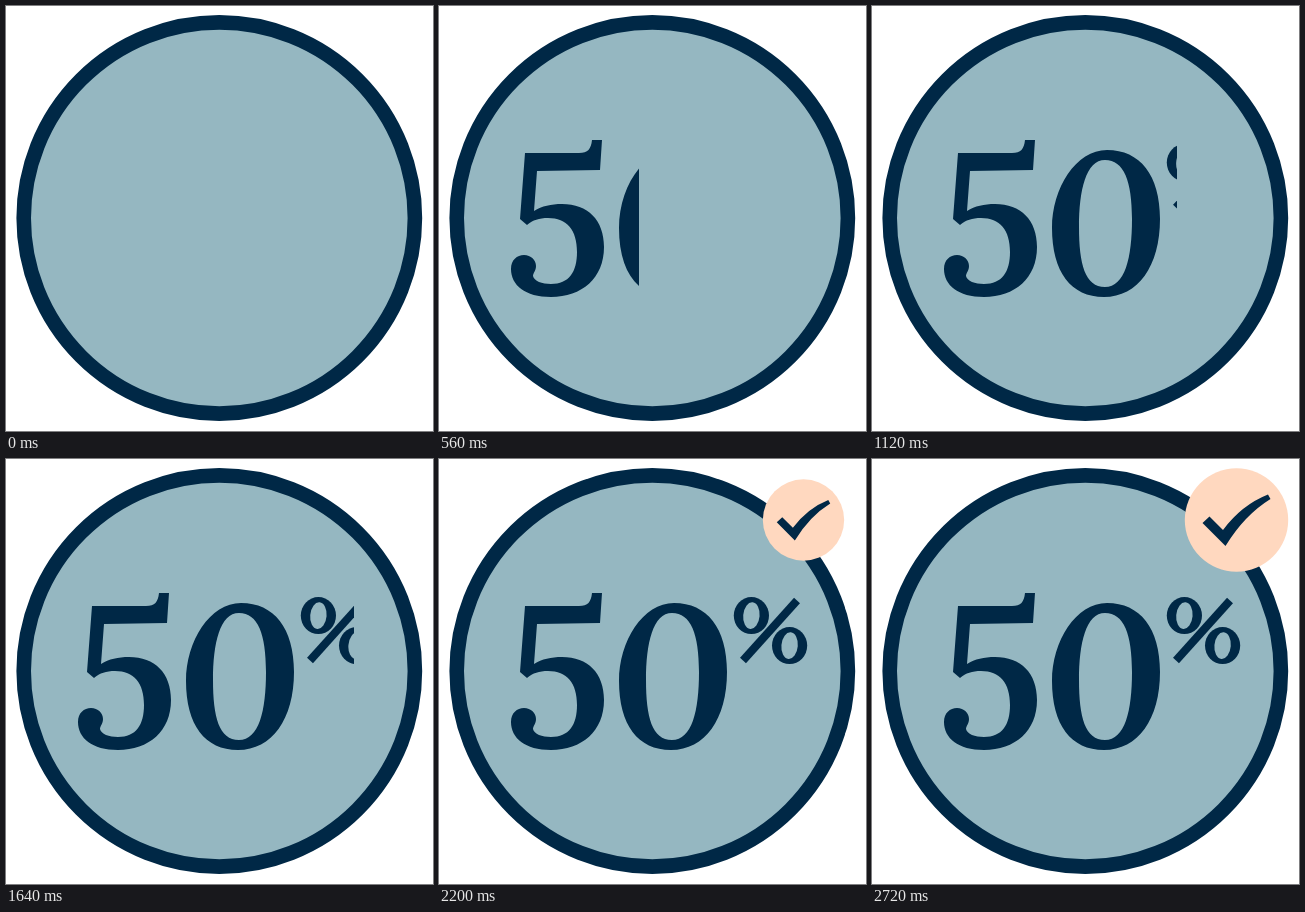
Animation of 427 by 425 pixels, one loop 3.84 s. Source, as an HTML page:

```html
<!DOCTYPE html>
<html lang="en">
<head>
<meta charset="utf-8">
<title>50%</title>
<style>
  html, body { margin: 0; width: 100%; height: 100%; overflow: hidden; background: #fff; }
  svg { display: block; width: 100%; height: 100%; }
</style>
</head>
<body>
<svg viewBox="0 0 427 425" role="img" aria-label="50%">
  <defs>
    <clipPath id="wipe"><rect id="edge" width="0" height="425"/></clipPath>
  </defs>
  <circle cx="213.3" cy="212" r="195.6" fill="#95b7c1" stroke="#002846" stroke-width="14.6"/>
  <g clip-path="url(#wipe)" fill="#002846" fill-rule="evenodd">
    <!-- five -->
    <path d="M86 147H140C149 147 152 143 153 134H163L161 164L98 165L95 205C103 200 112 198 123 198
      C149 198 165 214 165 241C165 272 143 291 112 291C86 291 72 279 72 263C72 254 78 249 85 249
      C92 249 97 254 97 260C97 265 94 267 94 270C95 275 103 278 112 278C130 278 138 266 138 246
      C138 224 128 212 109 212C100 212 94 214 88 219L81 213Z"/>
    <!-- zero -->
    <path d="M180 222C180 182 204 144 235 144C268 144 288 169 288 213C288 260 266 291 232 291
      C199 291 180 266 180 222ZM207 221C207 258 213 281 233 281C253 281 260 252 260 213
      C260 175 252 154 233 154C214 154 207 184 207 221Z"/>
    <!-- percent -->
    <path d="M358 141.5L304 201.5" stroke="#002846" stroke-width="8"/>
    <g id="ring">
      <ellipse cx="312.4" cy="156.6" rx="17.6" ry="18.5"/>
      <ellipse cx="312.4" cy="156.6" rx="8.2" ry="13.4" fill="#95b7c1" transform="rotate(5 312.4 156.6)"/>
    </g>
    <use href="#ring" x="38.2" y="30"/>
  </g>
  <g id="badge">
    <circle r="51.7" fill="#ffd8bf"/>
    <path d="M-34 3L-27 -3.5L-13.5 10Q5 -15 31.5 -25.5L34 -21Q8 -5 -11 26Z" fill="#002846"/>
  </g>
</svg>
<script>
  const LOOP = 3840, STEP = 40, FULL = 51.7, PEAK = 54.9;
  const edge = document.getElementById('edge');
  const badge = document.getElementById('badge');

  // Wipe keys: time, x, speed in px per ms
  const keys = [[0, 71, .05], [560, 200, .31], [1120, 305, .11], [1640, 348, .075], [1960, 370, .06]];

  const smooth = (t, a, b) => {
    const s = Math.min(1, Math.max(0, (t - a) / (b - a)));
    return s * s * (3 - 2 * s);
  };

  function wipeX(t) {
    const i = keys.findIndex(k => k[0] > t);
    if (i < 0) return 427;
    const [t0, x0, v0] = keys[i - 1], [t1, x1, v1] = keys[i];
    const d = t1 - t0, s = (t - t0) / d, r = 1 - s, p = s * s * (3 - 2 * s);
    return x0 + (x1 - x0) * p + d * s * r * (v0 * r - v1 * s);
  }

  function badgeRadius(t) {
    return PEAK * smooth(t, 1880, 2360) - (PEAK - FULL) * smooth(t, 2360, 2720);
  }

  function draw(t) {
    edge.setAttribute('width', wipeX(t).toFixed(2));
    const k = badgeRadius(t) / FULL;
    badge.setAttribute('visibility', k > 0 ? 'visible' : 'hidden');
    badge.setAttribute('transform', `translate(364.5 61) scale(${k.toFixed(4)})`);
  }

  let start;
  function tick(now) {
    start ??= now;
    const t = Math.max(0, now - start) % LOOP;
    draw(Math.floor(t / STEP) * STEP);
    requestAnimationFrame(tick);
  }
  draw(0);
  requestAnimationFrame(tick);
</script>
</body>
</html>
```
